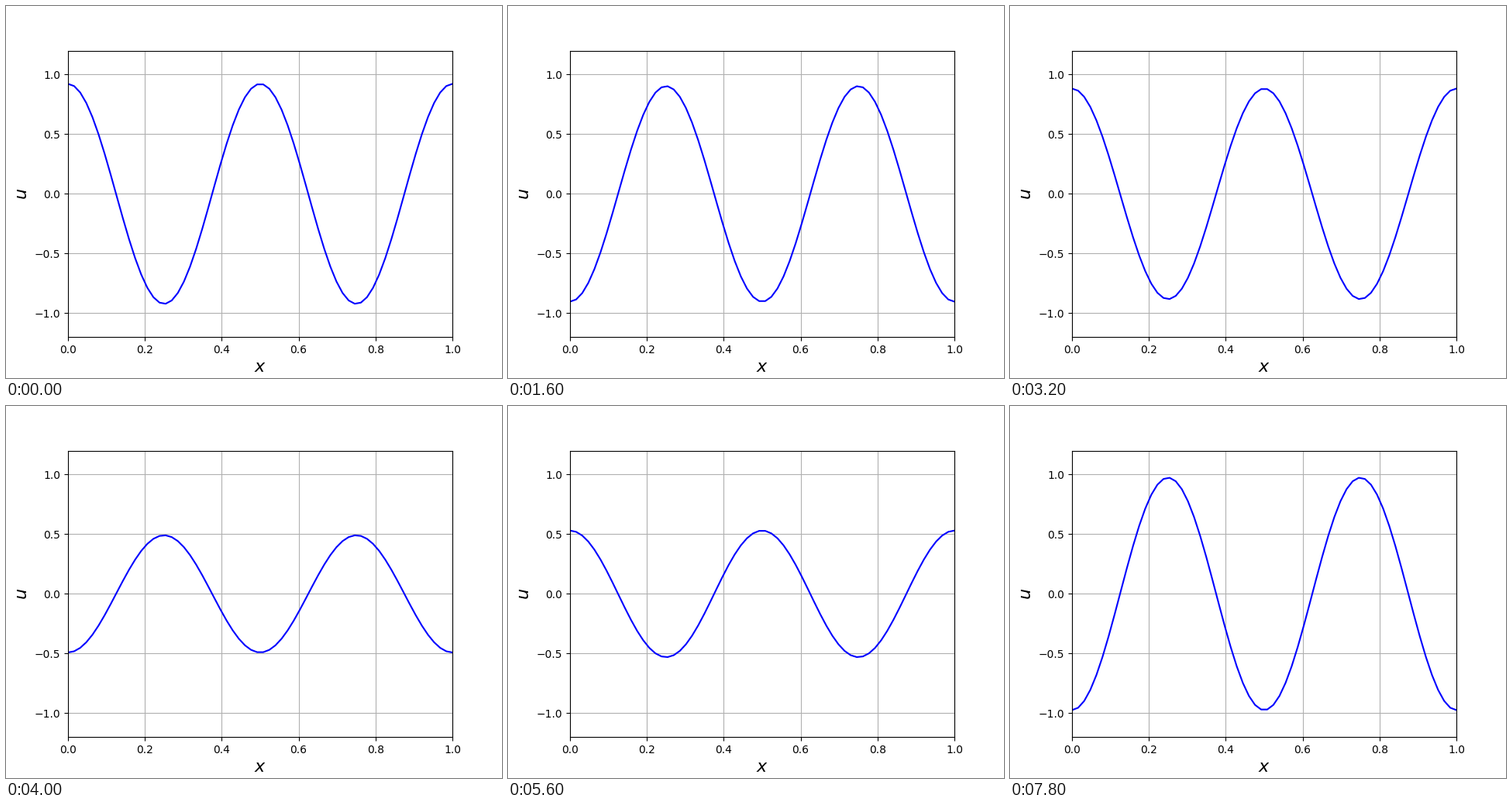
A matplotlib script that plays this animation: 640x480 px, repeating every 8 s.

```python
import numpy as np
import matplotlib.pyplot as plt
from matplotlib.animation import FuncAnimation

FRAMES = 40
INTERVAL = 200
CELLS = 63
COURANT = 0.5
STEPS_PER_FRAME = 4

x = np.linspace(0, 1, CELLS + 1)
shape = np.cos(4 * np.pi * x)

# Phase advance per frame of the standing wave under a leapfrog scheme
half_step = np.arcsin(COURANT * np.sin(2 * np.pi / CELLS))
omega = 2 * half_step * STEPS_PER_FRAME

fig, ax = plt.subplots(figsize=(6.4, 4.8), dpi=100)
ax.set_xlim(0, 1)
ax.set_ylim(-1.2, 1.2)
ax.set_xlabel("$x$", fontsize=16)
ax.set_ylabel("$u$", fontsize=16)
ax.grid(True)
line, = ax.plot(x, shape, color="b")


def update(i):
    line.set_ydata(np.cos(omega * (i + 1)) * shape)
    return line,


anim = FuncAnimation(fig, update, frames=FRAMES, interval=INTERVAL,
                     repeat=True, repeat_delay=0)
plt.show()
```
